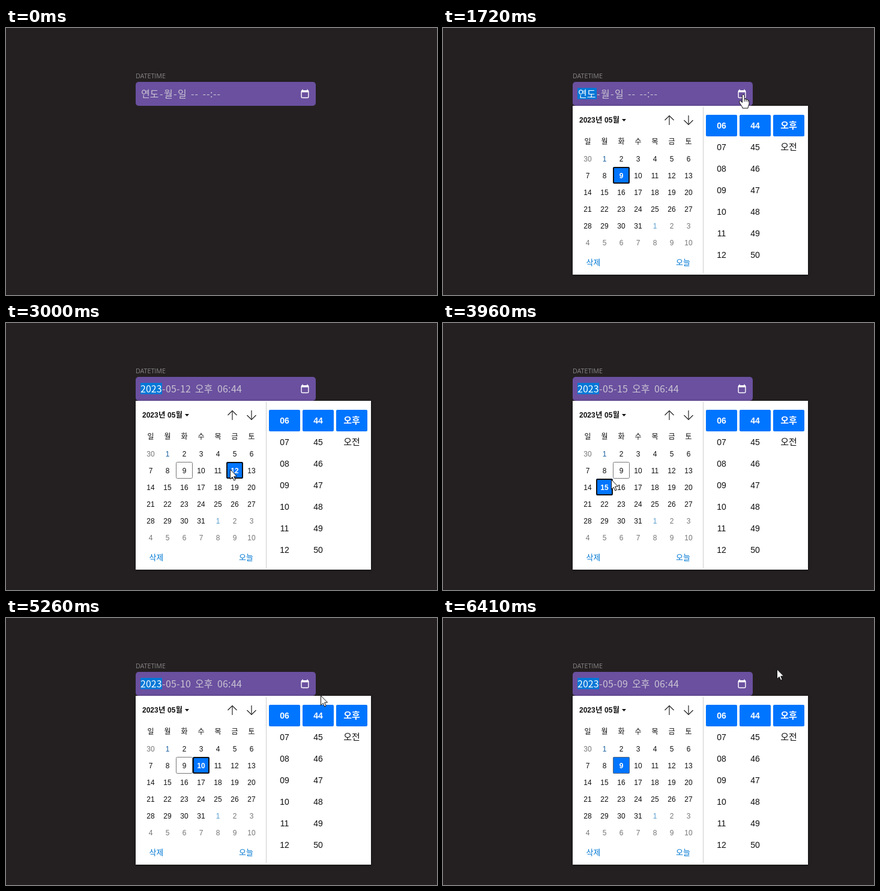
An HTML page with a canvas for the animation above (6470 ms loop, 718 by 446 pixels).

```html
<!DOCTYPE html>
<html lang="ko">
<head>
<meta charset="utf-8">
<title>Datetime picker</title>
<style>
html, body { margin: 0; width: 100%; height: 100%; overflow: hidden; background: #242021; }
canvas { display: block; }
</style>
</head>
<body>
<canvas id="stage" width="718" height="446"></canvas>
<script>
const ctx = document.getElementById('stage').getContext('2d');
const LOOP = 6470;
const BLUE = '#0075ff';
const KR = '"Noto Sans CJK KR", "Noto Sans CJK", sans-serif';
const ARIAL = '"Liberation Sans", Arial, "Noto Sans CJK KR", sans-serif';

const OPEN_AT = 1390, FOCUS_AT = 1330, TODAY_AT = 5860;

// Pointer moves: start, end, pointer tips spread evenly over `steps` holds
const moves = [
  { from: 120, to: 540, steps: 7, path: [[627, 352], [590, 280], [535, 170], [502, 108]] },
  { from: 1720, to: 2340, steps: 10, path: [[500, 111], [488, 128], [471, 152], [452, 178], [434, 202],
    [422, 220], [414, 232], [409, 239], [407, 241], [395, 241]] },
  { from: 2400, to: 2400, steps: 1, path: [[383, 241]] },
  { from: 2800, to: 3210, steps: 7, path: [[383, 241], [383, 241], [373, 244], [360, 249], [354, 260],
    [350, 274], [349, 285]] },
  { from: 3610, to: 3820, steps: 4, path: [[333, 279], [308, 268], [285, 262], [280, 261]] },
  { from: 3960, to: 4540, steps: 9, path: [[280, 261], [283, 259], [292, 255], [304, 250], [316, 246],
    [320, 245], [320, 245], [328, 245], [345, 243]] },
  { from: 4610, to: 5010, steps: 7, path: [[362, 235], [392, 215], [432, 185], [475, 152], [515, 120],
    [545, 97], [558, 86]] },
  { from: 5260, to: 5860, steps: 9, path: [[524, 129], [496, 188], [462, 262], [432, 328], [412, 370],
    [402, 390], [399, 395], [399, 395], [399, 395]] },
  { from: 5930, to: 6410, steps: 8, path: [[399, 395], [410, 385], [433, 358], [470, 280], [516, 170],
    [540, 116], [553, 91], [556, 85]] }
];
const presses = [[1270, 1390], [2800, 2870], [3350, 3410], [3820, 3960], [4320, 4390], [5785, 5930]];
const picks = [[2870, 12], [3410, 18], [3960, 15], [4390, 10], [TODAY_AT, 9]];

function pointerAt(t) {
  const move = moves.filter(m => t >= m.from).pop();
  if (!move) return null;
  const { from, to, steps, path } = move;
  if (steps === 1) return path[0];
  const step = Math.min(steps - 1, Math.floor((t - from) / (to - from) * (steps - 1) + 0.03));
  const u = step / (steps - 1) * (path.length - 1);
  const i = Math.min(path.length - 2, Math.floor(u + 1e-6));
  const f = u - i, a = path[i], b = path[i + 1];
  return [a[0] + (b[0] - a[0]) * f, a[1] + (b[1] - a[1]) * f];
}

function text(str, x, y, font, color, align = 'left') {
  ctx.font = font;
  ctx.fillStyle = color;
  ctx.textAlign = align;
  ctx.fillText(str, x, y);
}

function box(x, y, w, h, r, fill, stroke, line = 1) {
  ctx.beginPath();
  ctx.roundRect(x, y, w, h, r);
  if (fill) { ctx.fillStyle = fill; ctx.fill(); }
  if (stroke) {
    ctx.beginPath();
    ctx.roundRect(x + line / 2, y + line / 2, w - line, h - line, r);
    ctx.strokeStyle = stroke;
    ctx.lineWidth = line;
    ctx.stroke();
  }
}

function shape(points, fill, stroke, line = 1, close = true) {
  ctx.beginPath();
  points.forEach(([x, y]) => ctx.lineTo(x, y));
  if (close) ctx.closePath();
  ctx.lineWidth = line;
  ctx.lineJoin = close ? 'round' : 'miter';
  if (fill) { ctx.fillStyle = fill; ctx.fill(); }
  if (stroke) { ctx.strokeStyle = stroke; ctx.stroke(); }
}

function drawIcon() {
  box(491.4, 104, 13.2, 13.2, 1.6, null, '#fff', 1.4);
  ctx.fillStyle = '#fff';
  ctx.fillRect(492, 104, 12, 3.4);
  ctx.fillRect(493.3, 102.6, 1.5, 2);
  ctx.fillRect(501.3, 102.6, 1.5, 2);
}

function drawField(t, day) {
  text('DATETIME', 216, 84, '10.7px "Open Sans", "Noto Sans", sans-serif', '#878485');
  box(216, 90, 300, 40, 5, '#6a509f');
  const font = '16px ' + KR, dim = '#cbc5d3';
  const put = (str, x, color = dim) => text(str, x, 116, font, color);
  const mark = w => { ctx.fillStyle = '#0078d7'; ctx.fillRect(224, 100, w, 19); };
  if (day) {
    mark(36);
    put('2023', 224, '#fff');
    put('-', 260);
    put('05', 266);
    put('-', 284);
    put(String(day).padStart(2, '0'), 290);
    put('오후', 315);
    put('06', 352);
    put(':', 370);
    put('44', 375);
  } else {
    const focused = t >= FOCUS_AT;
    if (focused) mark(32);
    put('연도', 225, focused ? '#fff' : dim);
    put('월', 263);
    put('일', 286);
    put(':', 340);
    [256, 279, 308, 314.5, 327.5, 334, 345, 351.5].forEach(x => put('-', x));
  }
  drawIcon();
}

function drawHeader() {
  const bold = 'bold 12px ' + ARIAL, boldKr = 'bold 12.5px ' + KR;
  text('2023', 227, 158, bold, '#101010');
  text('년', 254, 158, boldKr, '#101010');
  text('05', 269, 158, bold, '#101010');
  text('월', 282.5, 158, boldKr, '#101010');
  shape([[298, 152], [305, 152], [301.5, 156]], '#101010');
  for (const [x, tip, tail] of [[377, 146.5, 162], [409, 161.5, 146]]) {
    const wing = tip + Math.sign(tail - tip) * 7.5;
    shape([[x, tip], [x, tail]], null, '#222', 1.2, false);
    shape([[x - 7.5, wing], [x, tip], [x + 7.5, wing]], null, '#222', 1.2, false);
  }
}

function drawDays(t, selected, tip) {
  [...'일월화수목금토'].forEach((d, i) => text(d, 241 + i * 28, 193.5, '12px ' + KR, '#101010', 'center'));
  for (let i = 0; i < 42; i++) {
    const x = 227 + i % 7 * 28, y = 204 + Math.floor(i / 7) * 28;
    const day = i === 0 ? 30 : i > 31 ? i - 31 : i;
    const inMonth = i > 0 && i < 32;
    const isSelected = inMonth && day === selected;
    const hover = tip && tip[0] >= x && tip[0] < x + 28 && tip[1] >= y && tip[1] < y + 28;
    let color = inMonth ? '#101010' : '#767676';
    if (day === 1) color = inMonth ? '#17609f' : '#5a9fd0';
    if (isSelected) {
      const focus = t < TODAY_AT;
      box(x, y, 28, 28, 2, BLUE, focus ? '#101010' : '#5c6470', focus ? 2 : 1);
      color = '#fff';
    } else if (hover) {
      box(x, y, 28, 28, 2, '#b0d5ff', '#101010');
    } else if (inMonth && day === 9) {
      box(x, y, 28, 28, 2, null, '#767676');
    }
    text(day, x + 14, y + 19, (isSelected ? 'bold ' : '') + '12px ' + ARIAL, color, 'center');
  }
}

function drawTimes() {
  const column = (x, items, font) => items.forEach((item, i) => {
    if (!i) box(x - 26, 145, 52, 36, 2, BLUE);
    text(item, x, 168 + i * 36, (i ? '' : 'bold ') + font, i ? '#101010' : '#fff', 'center');
  });
  const run = first => Array.from({ length: 7 }, (_, i) => String(first + i).padStart(2, '0'));
  column(464, run(6), '14px ' + ARIAL);
  column(520, run(44), '14px ' + ARIAL);
  column(576, ['오후', '오전'], '15px ' + KR);
}

function drawPopup(t, selected, tip) {
  ctx.save();
  ctx.shadowColor = 'rgba(0,0,0,.5)';
  ctx.shadowBlur = 4;
  ctx.shadowOffsetY = 1;
  ctx.fillStyle = '#fff';
  ctx.fillRect(216, 130, 392, 282);
  ctx.restore();
  ctx.fillStyle = '#cdcdcd';
  ctx.fillRect(433, 132, 1, 277);
  drawHeader();
  drawDays(t, selected, tip);
  text('삭제', 238.5, 396, '13px ' + KR, '#0078d4');
  text('오늘', 388, 396, '13px ' + KR, '#0078d4');
  drawTimes();
}

function drawPointer([x, y]) {
  ctx.save();
  ctx.translate(x, y);
  if (x > 489 && x < 506 && y > 101 && y < 118) {
    shape([[-1.5, 1.5], [-0.5, 0.5], [1, 0.5], [2, 1.5], [2, 7.5], [5, 8], [8, 9], [10, 11], [10, 16],
      [8.5, 20], [8, 23], [-1, 23], [-2, 20], [-6, 14], [-6.5, 11.5], [-4.5, 10.5], [-1.5, 13.5]],
      '#fff', '#111');
    shape([[2, 8], [2, 12]], null, '#111', 1, false);
    shape([[5, 8.5], [5, 12]], null, '#111', 1, false);
    shape([[8, 9.5], [8, 12.5]], null, '#111', 1, false);
  } else {
    shape([[0.5, 0.8], [0.5, 16.8], [4.2, 13.3], [6.7, 19], [9.2, 18], [6.7, 12.3], [11.5, 12]],
      '#fff', '#111');
  }
  ctx.restore();
}

function draw(t) {
  const tip = pointerAt(t);
  const pick = picks.filter(p => t >= p[0]).pop();
  const day = pick && pick[1];
  ctx.fillStyle = '#242021';
  ctx.fillRect(0, 0, 718, 446);
  drawField(t, day);
  if (t >= OPEN_AT) drawPopup(t, day || 9, tip);
  if (!tip) return;
  if (presses.some(([a, b]) => t >= a && t < b)) {
    ctx.beginPath();
    ctx.arc(tip[0] - 0.5, tip[1], 12, 0, Math.PI * 2);
    ctx.fillStyle = 'rgba(255,255,0,.5)';
    ctx.fill();
  }
  drawPointer(tip);
}

function tick() {
  draw(performance.now() % LOOP);
  requestAnimationFrame(tick);
}
tick();
</script>
</body>
</html>
```
